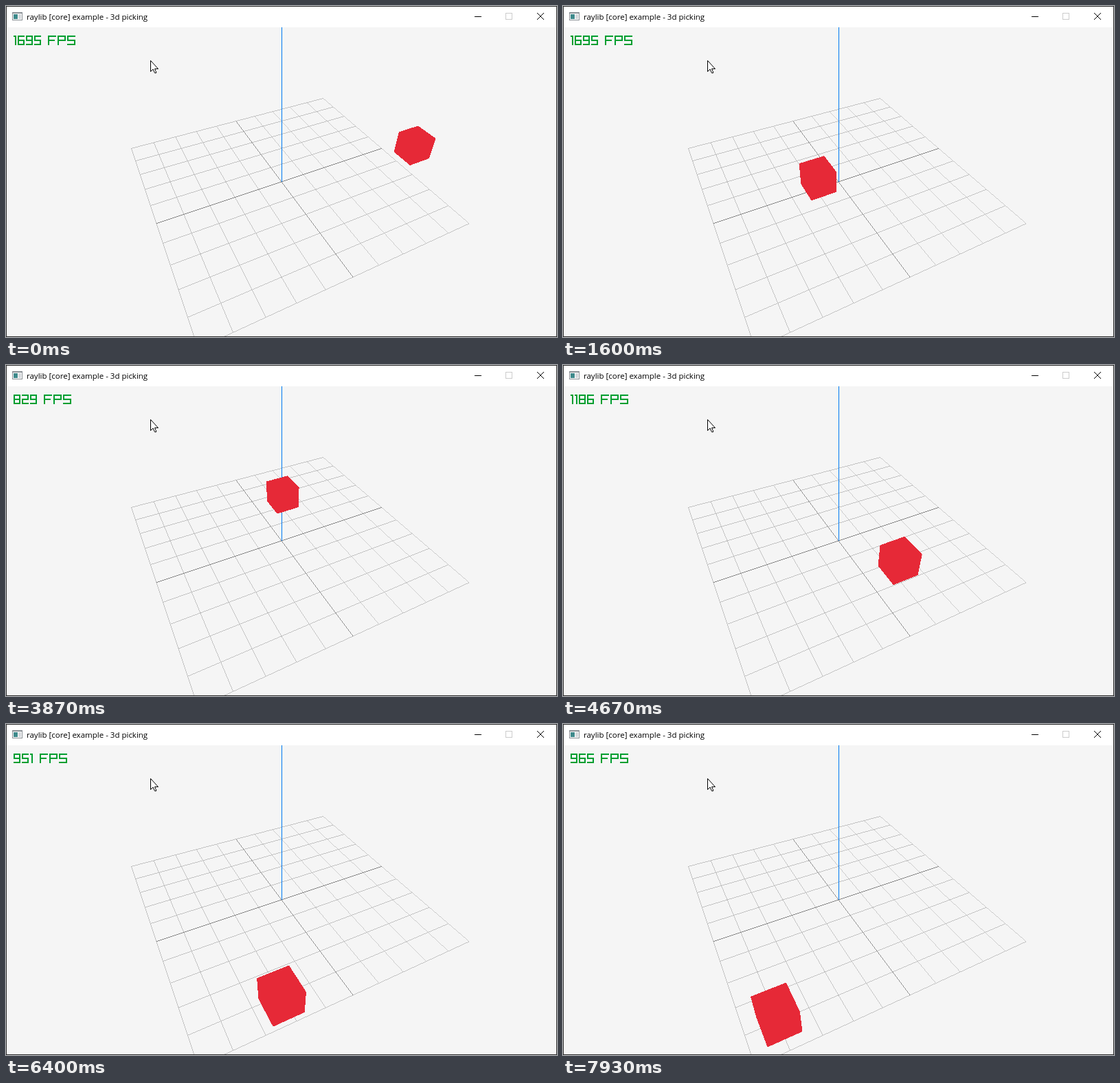
An HTML page that plays this animation: 802x482 px, repeating every 8000 ms.

```html
<!DOCTYPE html>
<html lang="en">
<head>
<meta charset="utf-8">
<title>3d picking</title>
<style>
  html, body { margin: 0; width: 100%; height: 100%; overflow: hidden; background: #f5f5f5; }
  svg { display: block; width: 802px; height: 482px; }
  text { font: 11.5px "Open Sans", "Noto Sans", sans-serif; }
  .crisp { shape-rendering: crispEdges; }
</style>
</head>
<body>
<svg viewBox="0 0 802 482">
  <defs><clipPath id="view"><rect x="1" y="31" width="800" height="450"/></clipPath></defs>
  <rect width="802" height="482" fill="#f5f5f5"/>
  <rect width="802" height="31" fill="#fff"/>

  <g class="crisp" clip-path="url(#view)">
    <g id="grid" fill="none"></g>
    <rect x="401" y="31" width="1" height="225" fill="#0079f1"/>
    <g id="cube" fill="#e62937"></g>
  </g>
  <path id="fps" class="crisp" fill="none" stroke="#009e2f" stroke-linecap="square" transform="translate(11 43) scale(2)"/>

  <g class="crisp">
    <rect x="9" y="9" width="15" height="12" fill="#8b9196"/>
    <rect x="10" y="11" width="13" height="9" fill="#fff"/>
    <rect x="11" y="12" width="6" height="7" fill="#3f8a8c"/>
    <rect x="18" y="12" width="4" height="7" fill="#d5d9dc"/>
  </g>
  <text x="30" y="20">raylib [core] example - 3d picking</text>
  <path class="crisp" d="M682 15.5h10" stroke="#000"/>
  <rect class="crisp" x="727.5" y="10.5" width="9" height="9" fill="none" stroke="#ccc"/>
  <path d="M773 10l10 10m0-10l-10 10" stroke="#000"/>
  <path d="M210.5 79.5V95.5L214 92L216.5 97.5H218.5V96L216.5 91.5H221.5Z" fill="#fff" stroke="#000"/>
  <rect class="crisp" x=".5" y=".5" width="801" height="481" fill="none" stroke="#2b2b2b"/>
</svg>

<script>
const STEPS = 120, STEP = 1000 / 15, LOOP = STEPS * STEP;
const FOCAL = 225 / Math.tan(Math.PI / 8), CX = 401, CY = 256, R5 = Math.sqrt(5);
const $ = id => document.getElementById(id);

function add(parent, tag, attrs = {}) {
  const el = document.createElementNS('http://www.w3.org/2000/svg', tag);
  for (const name in attrs) el.setAttribute(name, attrs[name]);
  return parent.appendChild(el);
}

// Camera at (-5, 10, 10) looking at the origin
function project([x, y, z]) {
  const k = FOCAL / (15 + (x - 2 * y - 2 * z) / 3);
  return [CX + k * (2 * x + z) / R5, CY - k * (2 * x + 5 * y - 4 * z) / (3 * R5)];
}

// Point of the plane y = 1 under a screen position
function pick(sx, sy) {
  const a = (sx - CX) / FOCAL, b = (CY - sy) / FOCAL;
  const d = 9 / (2 / 3 - b * R5 / 3), w = (15 - d) / 3;
  const u = a * d / R5, v = b * d / (3 * R5);
  return [2 * u + 2 * v - w, 1, u - 4 * v + 2 * w];
}

// Width is one pixel along the minor axis, as in a rasterised line
function gridLine(from, to, stroke) {
  const p = project(from), q = project(to);
  const dx = Math.abs(q[0] - p[0]), dy = Math.abs(q[1] - p[1]);
  add($('grid'), 'path', { d: `M${p}L${q}`, stroke, 'stroke-width': Math.max(dx, dy) / Math.hypot(dx, dy) });
}

function gridPair(i, stroke) {
  gridLine([i, 0, -5], [i, 0, 5], stroke);
  gridLine([-5, 0, i], [5, 0, i], stroke);
}
for (let i = 1; i <= 5; i++) {
  gridPair(-i, '#bfbfbf');
  gridPair(i, '#bfbfbf');
}
gridPair(0, '#7f7f7f');

const RING = [[-.5, -.5], [.5, -.5], [.5, .5], [-.5, .5]];
const faces = [];
for (let axis = 0; axis < 3; axis++)
  for (const side of [-.5, .5])
    faces.push({
      el: add($('cube'), 'polygon'),
      corners: RING.map(([p, q]) => {
        const c = [0, 0, 0];
        c[axis] = side; c[(axis + 1) % 3] = p; c[(axis + 2) % 3] = q;
        return c;
      })
    });

// Turning points of the drag: step, screen x, screen y
const PATH = [
  [0, 594, 203], [5, 455, 178], [14, 225, 297], [19, 454, 225], [21, 425, 169],
  [24, 371, 250.4], [31, 525, 225], [39, 380, 182], [44, 169, 282], [48, 300, 390],
  [53, 550, 270], [58, 402.5, 188.6], [61, 290, 245], [63, 290, 245], [68, 420, 310],
  [73, 557, 225], [80, 371.7, 164.2], [89, 330, 265], [96, 400.5, 395.4],
  [102, 578, 250], [108, 310, 250], [115, 550, 375], [119, 311.4, 422.8]
];

function slope(i, c) {
  const a = PATH[Math.max(i - 1, 0)], p = PATH[i], b = PATH[Math.min(i + 1, PATH.length - 1)];
  return a[c] === p[c] || b[c] === p[c] ? 0 : (b[c] - a[c]) / (b[0] - a[0]);
}

// Smooth cubic through the turning points
function along(step, c) {
  let i = 0;
  while (i < PATH.length - 2 && PATH[i + 1][0] <= step) i++;
  const p = PATH[i], q = PATH[i + 1], h = q[0] - p[0], s = (step - p[0]) / h, r = 1 - s;
  return r * r * (1 + 2 * s) * p[c] + s * s * (1 + 2 * r) * q[c]
    + h * s * r * (r * slope(i, c) - s * slope(i + 1, c));
}

// Block letters as strokes, with their widths in cells
const GLYPHS = {
  ' ': [3, ''],
  0: [5, 'M.5 .5h4v6h-4z'],
  1: [2, 'M.5 .5h1v6'],
  2: [5, 'M.5 .5h4v3h-4v3h4'],
  5: [5, 'M4.5 .5h-4v3h4v3h-4'],
  6: [5, 'M4.5 .5h-4v6h4v-3h-4'],
  7: [5, 'M.5 .5h4v6'],
  8: [5, 'M.5 .5h4v6h-4zM.5 3.5h4'],
  9: [5, 'M4.5 3.5h-4v-3h4v6h-4'],
  F: [6, 'M5.5 .5h-5v6M.5 3.5h4'],
  P: [6, 'M.5 6.5v-6h5v3h-5'],
  S: [6, 'M5.5 .5h-5v3h5v3h-5']
};
const RATES = { 0: 1695, 33: 1908, 54: 829, 69: 1186, 93: 951, 105: 817, 117: 965 };

function blockText(str) {
  let x = 0, d = '';
  for (const ch of str) {
    const [w, strokes] = GLYPHS[ch];
    d += strokes.replace(/M([\d.]+)/g, (_, n) => 'M' + (x + +n));
    x += w + 1;
  }
  return d;
}

function draw(ms) {
  const step = Math.floor((ms + 4) / STEP) % STEPS;
  const at = Math.min(step, PATH[PATH.length - 1][0]);
  const pos = pick(along(at, 1), along(at, 2));
  for (const { el, corners } of faces)
    el.setAttribute('points', corners.map(c => project(c.map((v, i) => v + pos[i]))).join(' '));
  const since = Object.keys(RATES).filter(s => s <= step).pop();
  $('fps').setAttribute('d', blockText(RATES[since] + ' FPS'));
}

function tick(now) {
  draw(now % LOOP);
  requestAnimationFrame(tick);
}
draw(0);
requestAnimationFrame(tick);
</script>
</body>
</html>
```
